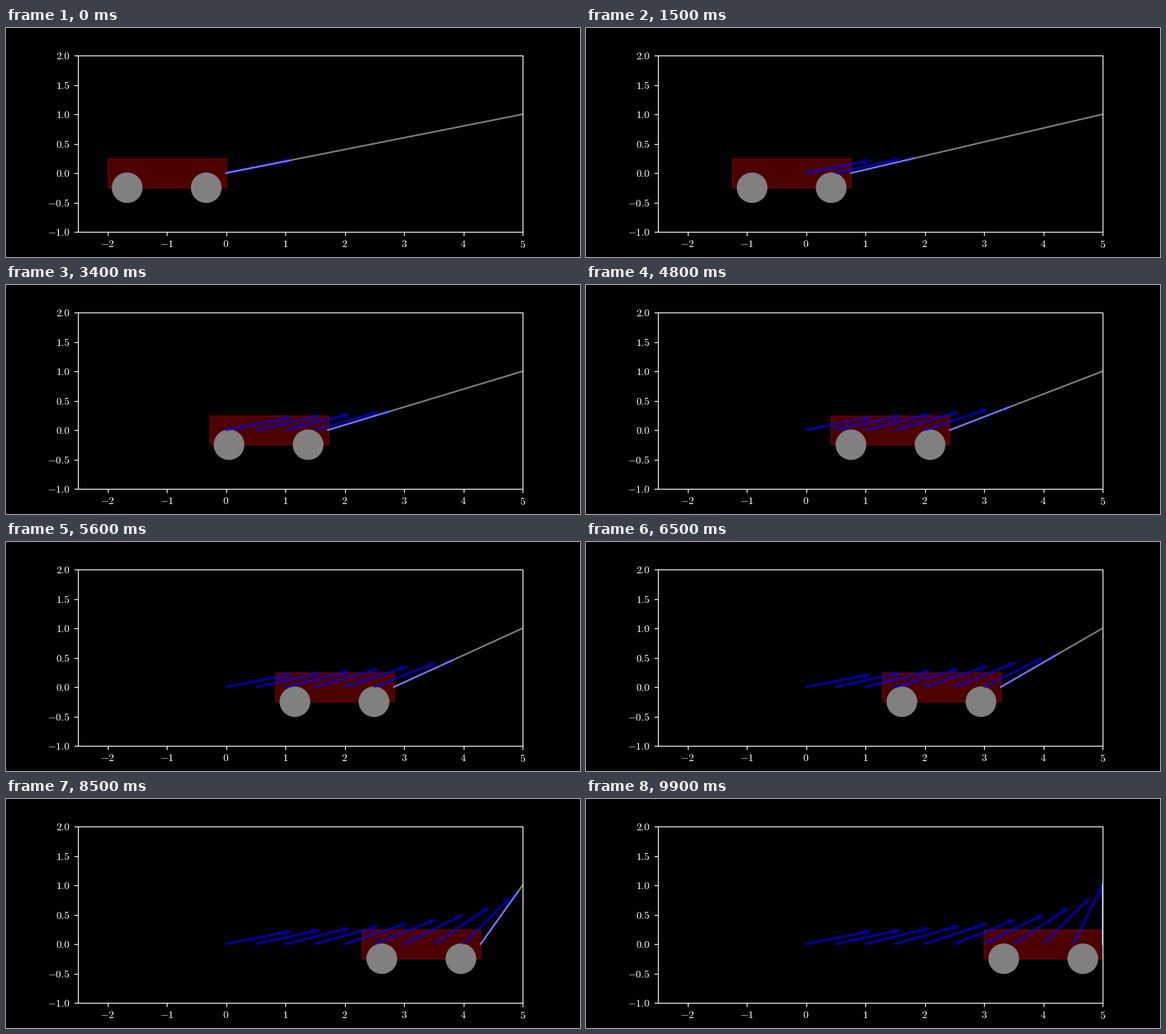
A matplotlib script for the animation above (10 s loop, 750 by 300 pixels).

```python
import numpy as np
import matplotlib.pyplot as plt
from matplotlib.animation import FuncAnimation
from matplotlib.patches import Circle, Rectangle

FRAMES, INTERVAL = 100, 100
ANCHOR = np.array([5.0, 1.0])
TRAIL = np.arange(0, 5, 0.5)
WHEELS = (-5 / 3, -1 / 3)

plt.style.use("dark_background")
plt.rcParams.update({"font.family": "Liberation Serif", "mathtext.fontset": "cm"})

fig, ax = plt.subplots(figsize=(7.5, 3), dpi=100)
ax.set(xlim=(-2.5, 5), ylim=(-1, 2))
ax.set_xticks(range(-2, 6))
ax.set_yticks(np.arange(-1, 2.1, 0.5))
ax.xaxis.set_major_formatter(lambda v, _: f"${v:.0f}$")
ax.yaxis.set_major_formatter(lambda v, _: f"${v:.1f}$")


def pull(x):
    """Unit vector from the cart's hitch at (x, 0) to the anchor."""
    d = ANCHOR - (x, 0)
    return d / np.hypot(*d)


def force_arrow(x):
    return ax.arrow(x, 0, *pull(x), width=0.025, color="blue", alpha=0.5)


body = ax.add_patch(Rectangle((-2, -0.25), 2, 0.5, color="red", alpha=0.3))
wheels = [ax.add_patch(Circle((dx, -0.25), 0.25, color="gray")) for dx in WHEELS]
trail = [force_arrow(x) for x in TRAIL]
force = force_arrow(0)
rope, = ax.plot([], [], color="white", alpha=0.5)


def update(i):
    x = 5 * i / (FRAMES - 1)
    body.set_x(x - 2)
    for wheel, dx in zip(wheels, WHEELS):
        wheel.center = (x + dx, -0.25)
    for arrow, start in zip(trail, TRAIL):
        arrow.set_visible(x >= start)
    dx, dy = pull(x)
    force.set_data(x=x, y=0, dx=dx, dy=dy)
    rope.set_data([x, ANCHOR[0]], [0, ANCHOR[1]])
    return [body, *wheels, *trail, force, rope]


anim = FuncAnimation(fig, update, frames=FRAMES, interval=INTERVAL, repeat=True)
plt.show()
```
